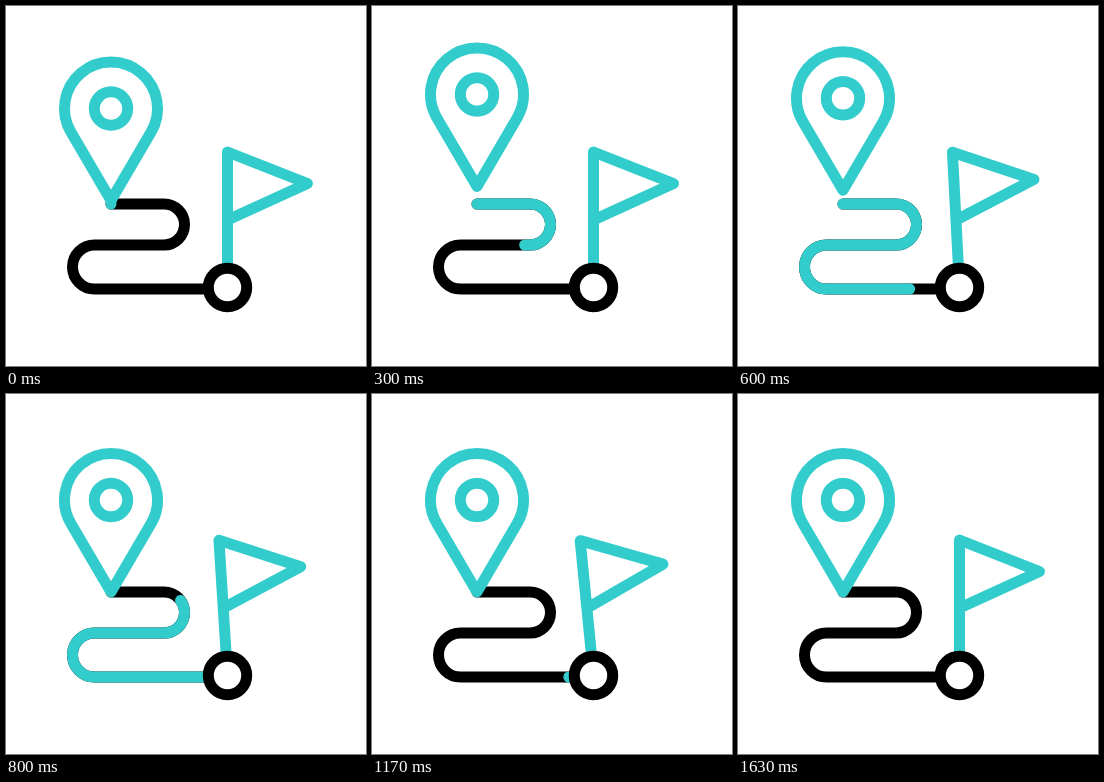
An HTML page for the animation above (1670 ms loop, 360 by 360 pixels).

```html
<!DOCTYPE html>
<html lang="en">
<head>
<meta charset="utf-8">
<title>Route</title>
<style>
  html, body { margin: 0; width: 100%; height: 100%; overflow: hidden; background: #fff; }
  svg { display: block; width: 100%; height: 100%; fill: none; stroke-width: 11; stroke-linecap: round; stroke-linejoin: round; }
  .teal { stroke: #33cccc; }
  .black { stroke: #000; }
</style>
</head>
<body>
<svg viewBox="0 0 360 360">
  <path class="black" d="M105 198H158A20.5 20.5 0 0 1 158 239H88.5A22 22 0 0 0 88.5 283H205"/>
  <path class="teal" id="trail" d="M105 198H158A20.5 20.5 0 0 1 158 239H88.5A22 22 0 0 0 88.5 283H205"/>
  <g class="teal" id="flag">
    <path d="M221.5 270V146L301.5 177.5L221.5 214"/>
  </g>
  <circle class="black" cx="221.5" cy="281.5" r="19.2" fill="#fff"/>
  <g class="teal" id="pin">
    <path d="M105 198L64.9 129.5A46.5 46.5 0 1 1 145.1 129.5Z"/>
    <circle cx="105" cy="106" r="16.7"/>
  </g>
</svg>
<script>
const LOOP = 1670;
const ROUTE = 366;
const [trail, flag, pin] = ['trail', 'flag', 'pin'].map(id => document.getElementById(id));

// Steps are [time in ms, value], eased in and out between neighbours.
const hop = [[-37, 0], [160, -35.5], [440, 0], [555, -18], [700, 0], [1633, 0], [1830, -35.5]];
const sway = [[533, 0], [715, -9.5], [965, 12], [1190, -6], [1410, 4.5], [1600, 0]];
const head = [[39, 0], [715, ROUTE]];
const tail = [[643, 0], [1198, ROUTE]];

function valueAt(steps, t) {
  if (t <= steps[0][0]) return steps[0][1];
  const next = steps.findIndex(([time]) => time > t);
  if (next < 0) return steps[steps.length - 1][1];
  const [t0, a] = steps[next - 1];
  const [t1, b] = steps[next];
  const u = (t - t0) / (t1 - t0);
  return a + (b - a) * u * u * (3 - 2 * u);
}

function draw(t) {
  const from = valueAt(tail, t);
  const length = Math.max(valueAt(head, t) - from, 0.01);
  trail.style.display = from < ROUTE ? '' : 'none';
  trail.setAttribute('stroke-dasharray', `${length} 999`);
  trail.setAttribute('stroke-dashoffset', -from);
  flag.setAttribute('transform', `rotate(${valueAt(sway, t)} 221.5 281.5)`);
  pin.setAttribute('transform', `translate(0 ${valueAt(hop, t)})`);
}

const start = performance.now();
function tick() {
  draw((performance.now() - start) % LOOP);
  requestAnimationFrame(tick);
}
tick();
</script>
</body>
</html>
```
